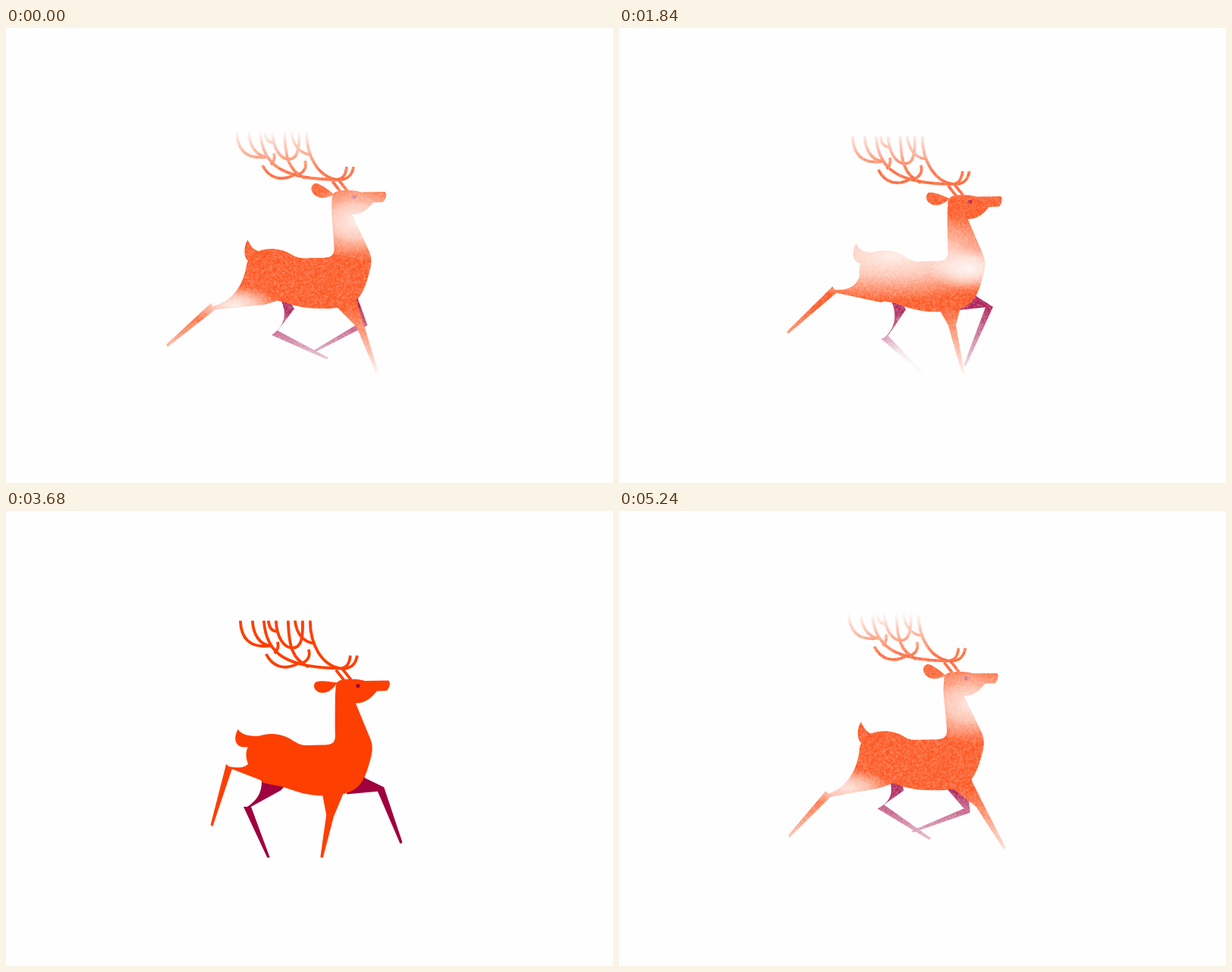
An HTML page with a canvas for the animation above (5280 ms loop, 800 px wide and 600 px high).

```html
<!DOCTYPE html>
<html lang="en">
<head>
<meta charset="utf-8">
<title>Running deer</title>
<style>
html, body { margin: 0; width: 100%; height: 100%; overflow: hidden; background: #fefefe; }
canvas { display: block; }
</style>
</head>
<body>
<canvas id="stage" width="800" height="600"></canvas>
<script>
const W = 800, H = 600, STEP = 40, LOOP = 132, STRIDE = 22;
const ORANGE = '#fd3f02', PURPLE = '#a0003f';
const stage = document.getElementById('stage').getContext('2d');
const layer = Object.assign(document.createElement('canvas'), { width: W, height: H });
const ctx = layer.getContext('2d');

// Key poses of one leg: phase, knee x,y, hoof x,y. The far leg runs half a stride later.
const HIND = [
  [0, 273,367, 212,419], [2, 284,345, 222,402], [4, 294,337, 271,415], [7, 310,349, 343,427],
  [11, 354,402, 424,436], [13, 350,408, 401,456], [15, 318,390, 346,457], [18, 293,385, 278,457]
];
const FORE = [
  [0, 467,393, 489,454], [2, 439,392, 454,457], [4, 427,402, 416,457], [7, 420,403, 345,424],
  [11, 472,390, 407,426], [13, 488,368, 456,445], [15, 494,367, 521,438], [18, 493,370, 557,419]
];

// Soft pale patches: time step, centre x,y, radii
const PATCHES = [
  [0, 462,255, 75,50], [0, 300,365, 60,25],
  [19, 455,308, 120,30], [19, 410,430, 220,80],
  [46, 360,300, 180,60], [46, 462,318, 55,28], [46, 380,450, 70,60],
  [65, 325,348, 130,55], [65, 390,155, 160,85], [65, 460,230, 90,65], [65, 430,400, 170,80]
];

// Letters tie points to the rump, chest or head
const BODY = `M h430,222 C h431,217 h436,215 h441,214.5 C h452,214 h462,214 h468,216.5
  L h499,216 C h502,217 h502,224 h497,229.5 L h484,230 C h476,240 h468,246 h456,246
  L c478,293 C c482,302 c482,308 c480,318 C c476,332 c473,345 c466,354
  C c455,368 c437,370 c418,370 C c395,370 r382,367 r365,361 L r340,356
  C r320,340 r312,322 r319,308 L r330,295 C r345,289 r362,290 r375,298
  C r381,302 c387,303.5 c393,303.5 L c415,303 C c427,303 c432,301 c432.5,292
  C c432,275 h429,250 h429,236 Z`;
const ANTLERS = `M h304,137 C h305,160 h316,174 h344,170
  M h320,137 C h321,155 h329,168 h343,170
  M h335,137 C h338,183 h367,199 h436,200
  M h341,137 C h342,147 h346,151 h352,151
  M h351,137 C h352,160 h362,173 h373,173 C h384,173 h387,160 h386,137
  M h367,137 C h368,170 h372,188 h394,198
  M h376,137 C h378,153 h386,165 h401,167
  M h396,137 C h396,170 h412,196 h436,200
  M h353,165 C h355,171 h353,176 h349,180
  M h338,181 C h346,197 h361,203 h379,194
  M h394,175 C h397,184 h392,190 h386,193
  M h430,202 L h441,216 M h438,200 L h450,215
  M h449,183 C h448,194 h444,199 h436,200
  M h458,183 C h456,195 h450,201 h436,200`;
const EAR = new Path2D('M1,-1C-11,-3 -23,-4 -28,-1C-32,4 -29,10 -23,12C-13,15 -6,9 1,-1Z');

const clamp = v => Math.min(1, Math.max(0, v));
const apart = (a, b) => Math.abs((a - b + LOOP * 1.5) % LOOP - LOOP / 2);

// Smooth cyclic interpolation of rows keyed by their first value
function sample(rows, period, t) {
  const n = rows.length;
  t %= period;
  let i = n - 1;
  while (rows[i][0] > t) i--;
  const row = k => rows[(k + n) % n];
  const time = k => row(k)[0] + Math.floor(k / n) * period;
  const span = time(i + 1) - time(i), s = (t - time(i)) / span;
  return row(i).slice(1).map((a, j) => {
    const v = k => row(k)[j + 1];
    const slope = k => (v(k + 1) - v(k - 1)) / (time(k + 1) - time(k - 1)) * span;
    const m = slope(i), q = slope(i + 1), d = v(i + 1) - a;
    return a + s * (m + s * (3 * d - 2 * m - q + s * (m + q - 2 * d)));
  });
}

function posed(text, bob) {
  const shift = { r: [0, 4 * bob], c: [2 * bob, 8 * bob], h: [7 * bob, 11 * bob] };
  return new Path2D(text.replace(/([rch])([\d.]+),([\d.]+)/g,
    (_, part, x, y) => `${+x + shift[part][0]},${+y + shift[part][1]}`));
}

// Tapered shin from knee to hoof, turned with the whole leg
function shin([kx, ky, hx, hy], hipX, hipY) {
  const dx = hx - hipX, dy = hy - hipY, len = Math.hypot(dx, dy);
  const nx = dy / len * 5, ny = -dx / len * 5;
  ctx.lineTo(kx - nx, ky - ny);
  ctx.lineTo(hx - nx * .35, hy - ny * .35);
  ctx.lineTo(hx + nx * .35, hy + ny * .35);
  ctx.lineTo(kx + nx, ky + ny);
}

function legs(phase, bob, color) {
  ctx.fillStyle = color;
  const hind = sample(HIND, STRIDE, phase), fore = sample(FORE, STRIDE, phase);
  let [kx, ky] = hind;
  const underX = kx * .5 + 203, underY = ky * .15 + 310;
  ctx.beginPath();
  ctx.moveTo(318, 308);
  ctx.quadraticCurveTo(kx + 38, ky * .4 + 210, kx, ky);
  shin(hind, 345, 330);
  ctx.lineTo(underX, underY);
  ctx.quadraticCurveTo(underX * .6 + 149, underY - 3, 372, 353);
  ctx.fill();

  kx = fore[0];
  const frontX = kx * .42 + 266;
  ctx.beginPath();
  ctx.moveTo(445, 335);
  ctx.lineTo(kx * .48 + 212, 368 + 8 * bob);
  shin(fore, 450, 330);
  ctx.lineTo(frontX, 372 - (frontX - 443) * .65);
  ctx.lineTo(460, 335);
  ctx.fill();
}

function makeGrain() {
  const w = 300, h = 260;
  const tile = Object.assign(document.createElement('canvas'), { width: w, height: h });
  const g = tile.getContext('2d'), img = g.createImageData(w, h);
  let seed = 7;
  for (let i = 3; i < img.data.length; i += 4) {
    seed = (seed * 1664525 + 1013904223) >>> 0;
    img.data[i] = (seed / 2 ** 32) ** 1.5 * 255;
  }
  g.putImageData(img, 0, 0);
  return tile;
}
const grain = makeGrain();

function erasePatch(x, y, rx, ry, strength) {
  const soft = ctx.createRadialGradient(0, 0, 0, 0, 0, 1);
  soft.addColorStop(0, '#000');
  soft.addColorStop(.45, '#000b');
  soft.addColorStop(1, '#0000');
  ctx.save();
  ctx.globalAlpha = strength;
  ctx.translate(x, y);
  ctx.scale(rx, ry);
  ctx.fillStyle = soft;
  ctx.fillRect(-1, -1, 2, 2);
  ctx.restore();
}

// The deer thins out at top and bottom, under patches and grain, then turns solid again
function fade(step) {
  const fog = clamp((apart(step, 99) - 7) / 18);
  const veil = ctx.createLinearGradient(0, 137, 0, 458);
  [[0, .97], [.16, .22], [.3, .1], [.72, .1], [1, .97]].forEach(([at, a]) =>
    veil.addColorStop(at, `rgba(0,0,0,${a * fog})`));
  ctx.globalCompositeOperation = 'destination-out';
  ctx.fillStyle = veil;
  ctx.fillRect(0, 0, W, H);
  for (const [time, ...shape] of PATCHES)
    erasePatch(...shape, .9 * fog * clamp(1 - apart(step, time) / 14));
  ctx.globalAlpha = .32 * fog;
  ctx.drawImage(grain, 180, 110, 450, 390);
  ctx.globalAlpha = 1;
  ctx.globalCompositeOperation = 'source-over';
}

function draw(step) {
  const phase = step % STRIDE;
  const wave = peak => Math.cos((phase - peak) * Math.PI * 4 / STRIDE);
  const bob = .21 - .5 * wave(9), sway = wave(10.3);
  ctx.clearRect(0, 0, W, H);
  legs(phase + STRIDE / 2, bob, PURPLE);

  ctx.strokeStyle = ORANGE;
  ctx.lineWidth = 3.8;
  ctx.stroke(posed(ANTLERS, bob));
  legs(phase, bob, ORANGE);
  ctx.fill(posed(BODY, bob));

  const tipX = 312 + 7 * sway, tipY = 283 - 5 * wave(9.7), dy = 4 * bob;
  ctx.beginPath();
  ctx.moveTo(334, 294 + dy);
  ctx.quadraticCurveTo(tipX + 7, 295 + dy, tipX, tipY);
  ctx.bezierCurveTo(tipX - 7, tipY + 12, tipX - 4, tipY + 27, 321, 308 + dy);
  ctx.lineTo(340, 312);
  ctx.fill();

  ctx.save();
  ctx.translate(431 + 7 * bob, 220 + 11 * bob);
  ctx.fillStyle = PURPLE;
  ctx.beginPath();
  ctx.arc(28, 3, 2.6, 0, 7);
  ctx.fill();
  ctx.fillStyle = ORANGE;
  ctx.rotate(.28 + .28 * sway);
  ctx.fill(EAR);
  ctx.restore();

  fade(step);
  stage.fillStyle = '#fefefe';
  stage.fillRect(0, 0, W, H);
  stage.drawImage(layer, 0, 0);
}

const start = performance.now();
function tick() {
  draw(Math.floor((performance.now() - start) / STEP) % LOOP);
  requestAnimationFrame(tick);
}
tick();
</script>
</body>
</html>
```
